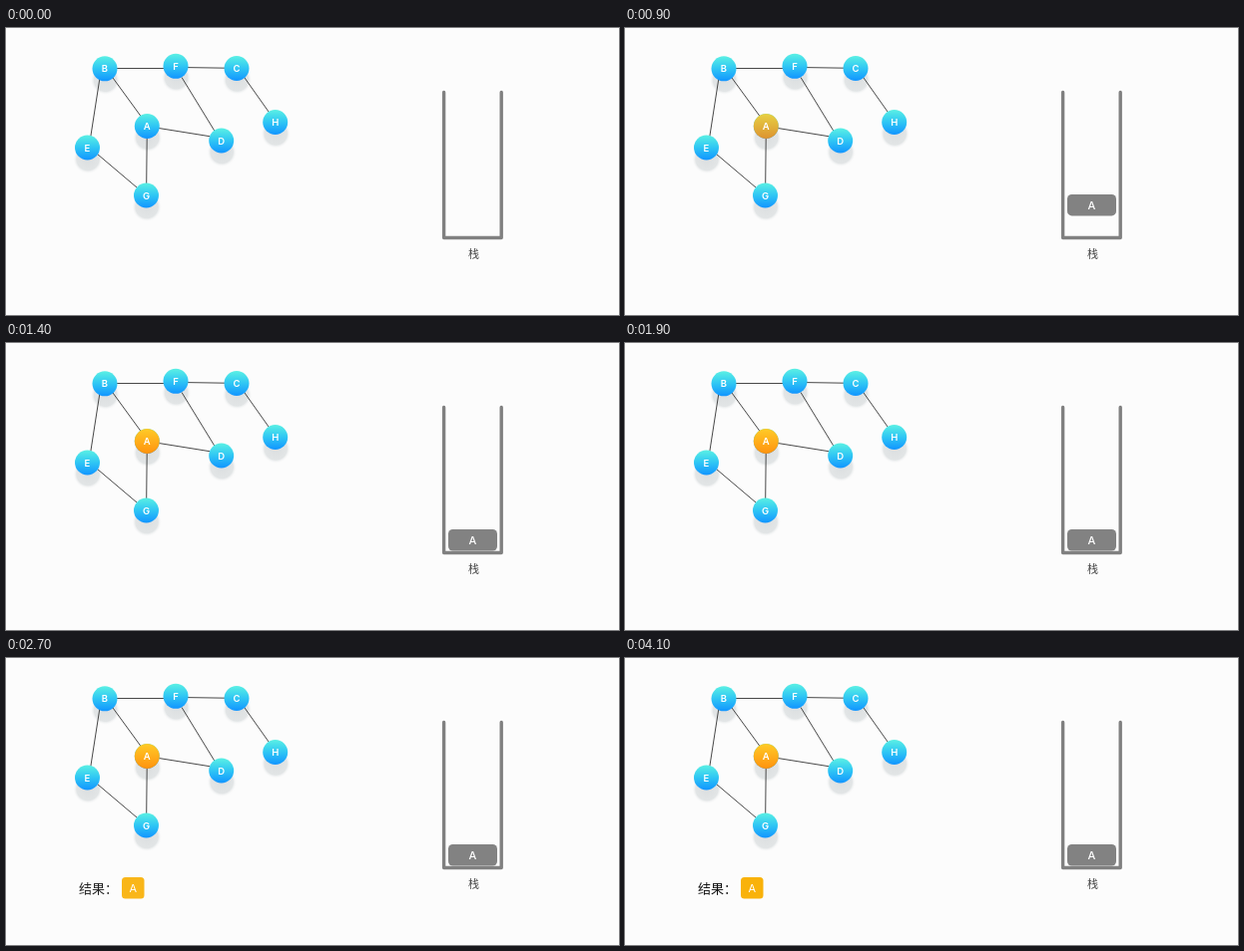
These frames come from a looping animation (614 by 288 pixels, 4200 ms). An HTML page:

```html
<!DOCTYPE html>
<html lang="zh">
<head>
<meta charset="utf-8">
<style>
html, body { margin: 0; width: 100%; height: 100%; overflow: hidden; background: #fcfcfc; }
svg { display: block; width: 614px; height: 288px; }
text { font-family: Inter, sans-serif; fill: #fff; text-anchor: middle; }
.letter { font-size: 9.5px; font-weight: 600; }
.tag { font-size: 11px; font-weight: 500; }
.cjk { font-family: "Noto Sans CJK SC", "Noto Sans CJK", sans-serif; }
</style>
</head>
<body>
<svg viewBox="0 0 614 288">
  <defs>
    <linearGradient id="blue" x2="0" y2="1">
      <stop stop-color="#5af0e4"/><stop offset=".5" stop-color="#2fc6f4"/>
      <stop offset="1" stop-color="#1295ff"/>
    </linearGradient>
    <linearGradient id="orange" x2="0" y2="1">
      <stop stop-color="#ffcb27"/><stop offset="1" stop-color="#ff930f"/>
    </linearGradient>
    <radialGradient id="shade">
      <stop stop-color="#dcdfe0"/><stop offset=".75" stop-color="#e2e5e6"/>
      <stop offset="1" stop-color="#fcfcfc" stop-opacity="0"/>
    </radialGradient>
  </defs>
  <g id="shadows" fill="url(#shade)"></g>
  <g id="edges" stroke="#484848" stroke-width="1"></g>
  <g id="nodes"></g>
  <path d="M438.6 64.5V210.5H496.2V64.5" fill="none" stroke="#808080" stroke-width="3.4"
    stroke-linecap="round" stroke-linejoin="round"/>
  <text class="cjk" x="468.5" y="231" font-size="11" style="fill:#444">栈</text>
  <g id="block">
    <rect x="443" y="187" width="49" height="21.5" rx="4.5" fill="#828282"/>
    <text class="tag" x="467.3" y="201.7">A</text>
  </g>
  <g id="result">
    <text class="cjk" x="73" y="235.5" font-size="13" style="fill:#111;text-anchor:start">结果：</text>
    <rect x="116" y="220" width="22.5" height="21.5" rx="3.5" fill="#f9b20a"/>
    <text class="tag" x="127.2" y="235" style="font-weight:400">A</text>
  </g>
</svg>
<script>
const nodes = {
  B: [99, 40.8], F: [170, 38.3], C: [231, 40.5], H: [269.7, 94.5],
  A: [141.3, 98.5], D: [215.7, 113], E: [81.5, 120], G: [140.5, 168]
};
const edges = [
  [110, 40.5, 159, 40.5], [181, 39.6, 220, 40.2], [239, 50, 263, 84], [107, 50, 135, 88.5],
  [176, 49.5, 209, 103.5], [153, 100.5, 204, 108.7], [141.2, 110, 140.7, 157],
  [91.5, 126.5, 131, 160], [93.8, 51, 84.8, 109]
];
const LOOP = 4200, STEP = 100;
const $ = id => document.getElementById(id);

function add(parent, tag, attrs, text = '') {
  const el = document.createElementNS('http://www.w3.org/2000/svg', tag);
  for (const k in attrs) el.setAttribute(k, attrs[k]);
  el.textContent = text;
  return $(parent).appendChild(el);
}
const disc = (cx, cy, fill) => add('nodes', 'circle', { cx, cy, r: 12.5, fill });

for (const [x1, y1, x2, y2] of edges) add('edges', 'line', { x1, y1, x2, y2 });

let glow;
for (const [name, [x, y]] of Object.entries(nodes)) {
  add('shadows', 'circle', { cx: x + .5, cy: y + 11.5, r: 15 });
  disc(x, y, 'url(#blue)');
  if (name === 'A') glow = disc(x, y, 'url(#orange)');
  add('nodes', 'text', { x, y: y + 3.5, class: 'letter' }, name);
}

const ramp = (t, from, to) => Math.min(1, Math.max(0, (t - from) / (to - from)));
const easeOut = p => 1 - (1 - p) ** 3;

function draw(now) {
  const t = Math.floor((now % LOOP) / STEP) * STEP;
  glow.style.opacity = ramp(t, 600, 950);
  $('block').style.opacity = ramp(t, 600, 850);
  const lift = 140 * (1 - easeOut(ramp(t, 600, 1230)));
  $('block').setAttribute('transform', `translate(0 ${-lift})`);
  $('result').style.opacity = ramp(t, 2400, 2720);
}

const start = performance.now();
function tick() {
  draw(performance.now() - start);
  requestAnimationFrame(tick);
}
tick();
</script>
</body>
</html>
```
